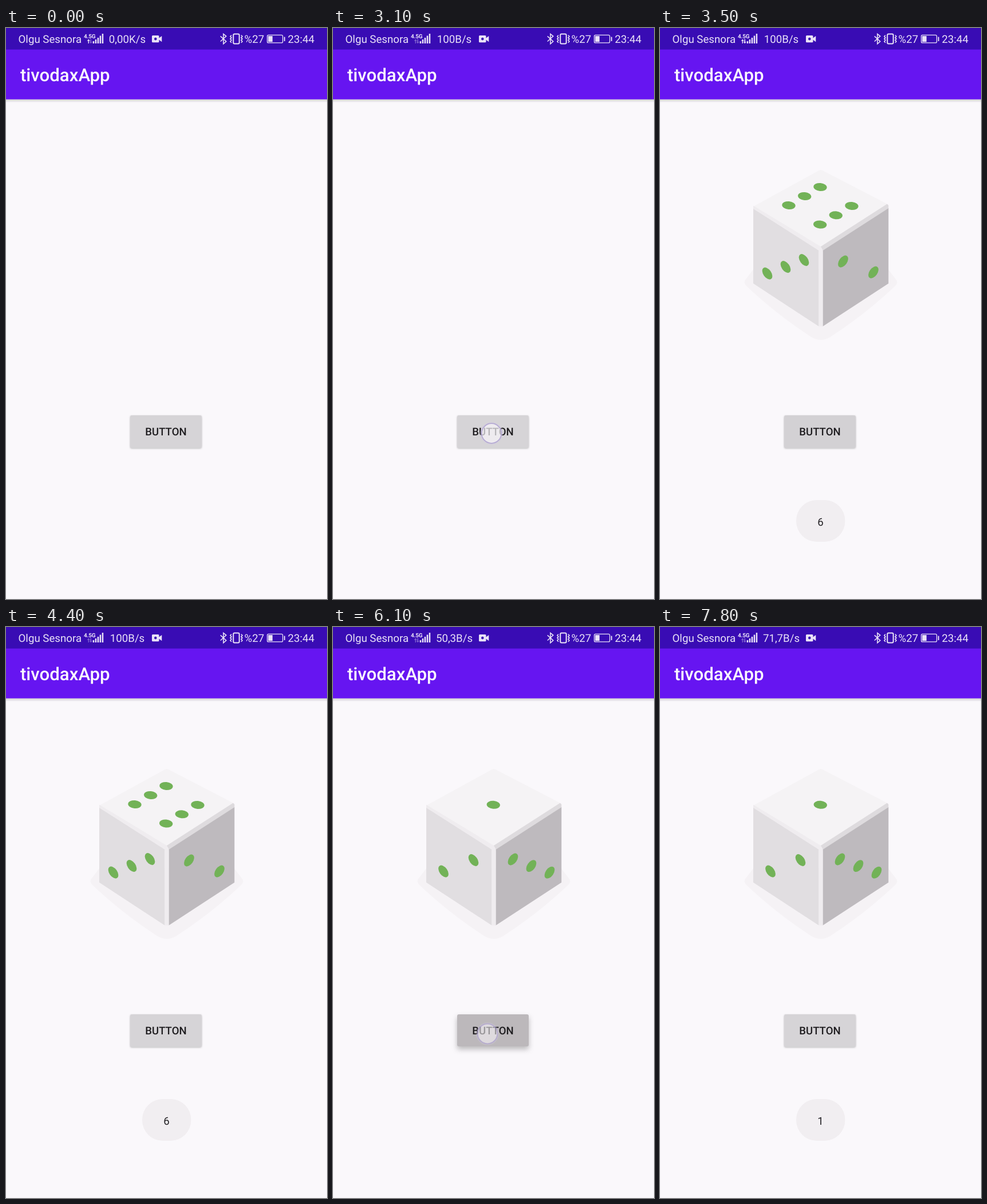
An HTML page for the animation above (8000 ms loop, 561 by 998 pixels).

```html
<!DOCTYPE html>
<html lang="en">
<head>
<meta charset="utf-8">
<title>Dice roller</title>
<style>
  html, body { margin: 0; width: 100%; height: 100%; overflow: hidden; background: #faf8fb; }
  svg { display: block; width: 100%; height: 100%; }
  text { font-family: Roboto, "Open Sans", sans-serif; font-size: 18.7px; text-rendering: geometricPrecision; }
  .mid { text-anchor: middle; }
  .status { fill: #e9e2f7; }
  .line { fill: none; stroke: #e9e2f7; stroke-width: 1.6; }
  .title { font-size: 31.2px; font-weight: 500; fill: #fbf8ff; }
  .net { font-size: 10px; font-weight: 700; font-stretch: 75%; letter-spacing: -.2px; }
  .label { font-size: 18.6px; font-weight: 500; fill: #1f1d20; }
  .pips { fill: #72b257; }
</style>
</head>
<body>
<svg viewBox="0 0 561 998">
  <defs>
    <linearGradient id="shade" x2="0" y2="1">
      <stop stop-color="#000" stop-opacity=".17"/>
      <stop offset="1" stop-color="#000" stop-opacity="0"/>
    </linearGradient>
  </defs>
  <rect width="561" height="998" fill="#faf8fb"/>
  <rect y="124.5" width="561" height="6" fill="url(#shade)"/>
  <rect y="37" width="561" height="87.7" fill="#6615f1"/>
  <rect width="561" height="37.6" fill="#390cb4"/>

  <g class="status">
    <text x="21.5" y="26">Olgu Sesnora</text>
    <text class="net" x="136" y="17.5">4.5G</text>
    <path id="up" d="M143.6 27v-4.6h-2l2.7-3 2.7 3h-2V27z"/>
    <path id="down" d="M147.4 19.6v4.6h-1.8l2.6 3 2.6-3H149v-4.6z"/>
    <g id="bars"></g>
    <text id="speed" class="mid" x="212" y="26"></text>
    <path fill-rule="evenodd" d="M256.5 13h9.5q1.5 0 1.5 1.5v3l4.8-3.6v10.4l-4.8-3.6v3q0 1.5-1.5 1.5h-9.5q-1.5 0-1.5-1.5v-9.200q0-1.500 1.500-1.500zM261.300 16.800a2.300 2.300 0 1 0 .01 0z"/>
    <path class="line" d="M374.800 14.300L384.800 23.500 380 27.800V10.400l4.800 3.900-10 9.200"/>
    <rect class="line" x="397.300" y="10.600" width="10.400" height="16.800" rx="2" style="stroke-width:2"/>
    <path class="line" d="M394 12.500l-2 2.200 2 2.200-2 2.200 2 2.200-2 2.200 2 2.200M411 12.500l2 2.200-2 2.200 2 2.200-2 2.200 2 2.200-2 2.200"/>
    <text x="416.500" y="26">%27</text>
    <rect class="line" x="456.600" y="12.300" width="27" height="13.600" rx="2" style="stroke-width:1.300"/>
    <rect x="458.200" y="14" width="7.600" height="10.300"/>
    <rect x="485.800" y="15.500" width="1.900" height="7.500" rx=".6"/>
    <text x="492.500" y="26">23:44</text>
  </g>
  <text class="title" x="24.900" y="93">tivodaxApp</text>

  <g id="dice">
    <path fill="#f5f2f5" d="M163 422L148.500 441Q146 446 151 451Q204 501 265 540.500Q281 549.500 297 540.500Q358 501 411 451Q416 446 413.500 441L399 422z"/>
    <path fill="#f5f3f5" d="M163 312L276 250Q281 246.500 286 250L396 307Q399 309 399 312L281 386z"/>
    <path fill="#efecef" d="M163 310.500L281 382V390H277L163 317z"/>
    <path fill="#dedbde" d="M397 307.500L399.300 310V316L285 390H281V382z"/>
    <path fill="#e1dee1" d="M163 316L277.500 389V521.500L163 446.500z"/>
    <path fill="#bebabe" d="M399.300 315L284.500 389V521.500L399.300 446.500z"/>
    <path fill="#efecef" d="M277.500 388L281 382 284.500 388V521.500H277.500z"/>
    <g class="pips" id="six"></g>
    <g class="pips" id="one"></g>
  </g>

  <rect id="button" x="217" y="677" width="125" height="57" rx="3"/>
  <text class="label mid" x="279.500" y="712.300">BUTTON</text>
  <g id="touch">
    <circle r="19" fill="none" stroke="#cfc7e2" stroke-width="1.500" opacity=".4"/>
    <circle r="17.300" fill="#f8f5f9" fill-opacity=".7" stroke="#b5a9d4" stroke-width="1.800"/>
  </g>

  <g id="toast">
    <rect x="238" y="825" width="85.500" height="73" rx="36" fill="#f1eef1"/>
    <text id="roll" class="mid" x="280.500" y="869.700" fill="#242226"></text>
  </g>
</svg>
<script>
const LOOP = 8000, TICK = 100;
const $ = id => document.getElementById(id);

function add(parent, tag, attrs) {
  const el = document.createElementNS("http://www.w3.org/2000/svg", tag);
  for (const k in attrs) el.setAttribute(k, attrs[k]);
  $(parent).append(el);
}

function pips(id, angle, points) {
  for (const [x, y] of points)
    add(id, "ellipse", { rx: 11.7, ry: 7, transform: `translate(${x} ${y}) rotate(${angle})` });
}

const TOP = 5, LEFT = 55, RIGHT = -55;
pips("six", TOP, [[280, 278], [252.7, 294], [225, 310], [335, 311], [307.3, 327.3], [279.7, 343.5]]);
pips("six", LEFT, [[187.500, 429], [219.500, 417.500], [251.500, 405.500]]);
pips("six", RIGHT, [[320, 408], [373, 427]]);
pips("one", TOP, [[280.300, 310.800]]);
pips("one", LEFT, [[193, 427], [245.500, 407.500]]);
pips("one", RIGHT, [[314.500, 406], [346.500, 417.700], [378.500, 429.200]]);

[4, 7, 10, 13.500, 17].forEach((h, i) =>
  add("bars", "rect", { x: 151.700 + i * 4, y: 27 - h, width: 2.500, height: h }));

// Each track lists [start ms, value]; a value holds until the next entry.
const tracks = {
  speed: [[0, "0,00K/s"], [1800, "100B/s"], [4800, "50,3B/s"], [7800, "71,7B/s"]],
  up: [[0, 1], [1300, .4], [3300, 1], [4300, .4]],
  down: [[0, .4], [3300, 1], [4300, .4]],
  face: [[0, 0], [3200, 6], [6100, 1]],
  press: [[0, 0], [3200, .9], [3300, .65], [3400, .3], [3500, .1], [3600, 0],
          [6100, 1], [6200, .6], [6300, .2], [6400, 0]],
  touch: [[0, 0], [3100, 1], [3200, .8], [3300, .3], [3400, 0],
          [6000, 1], [6100, .8], [6200, .3], [6300, 0]],
  toast: [[0, 0], [3300, .4], [3400, .8], [3500, 1], [5200, .4], [5300, .02], [5400, 0],
          [6200, .3], [6300, .7], [6400, 1]]
};

const at = (name, t) => tracks[name].findLast(([start]) => start <= t)[1];
const mix = (a, b, k) => a + (b - a) * k;

function draw(t) {
  const face = at("face", t), press = at("press", t);
  $("speed").textContent = at("speed", t);
  for (const id of ["up", "down", "touch", "toast"]) $(id).style.opacity = at(id, t);

  $("dice").style.display = face ? "" : "none";
  $("six").style.display = face === 6 ? "" : "none";
  $("one").style.display = face === 1 ? "" : "none";
  $("roll").textContent = face || "";

  const [r, g, b] = [[214, 188], [212, 184], [215, 187]].map(([from, to]) => Math.round(mix(from, to, press)));
  const lift = mix(1.500, 5, press);
  $("button").style.fill = `rgb(${r},${g},${b})`;
  $("button").style.filter = `drop-shadow(0 ${lift}px ${lift}px rgba(0,0,0,.25))`;
  $("button").setAttribute("height", mix(57, 56, press));
  $("touch").setAttribute("transform", t < 5000 ? "translate(277 708.5)" : "translate(270 711)");
}

const begin = performance.now();
function frame() {
  const t = (performance.now() - begin) % LOOP;
  draw(Math.floor(t / TICK) * TICK);
  requestAnimationFrame(frame);
}
frame();
</script>
</body>
</html>
```
